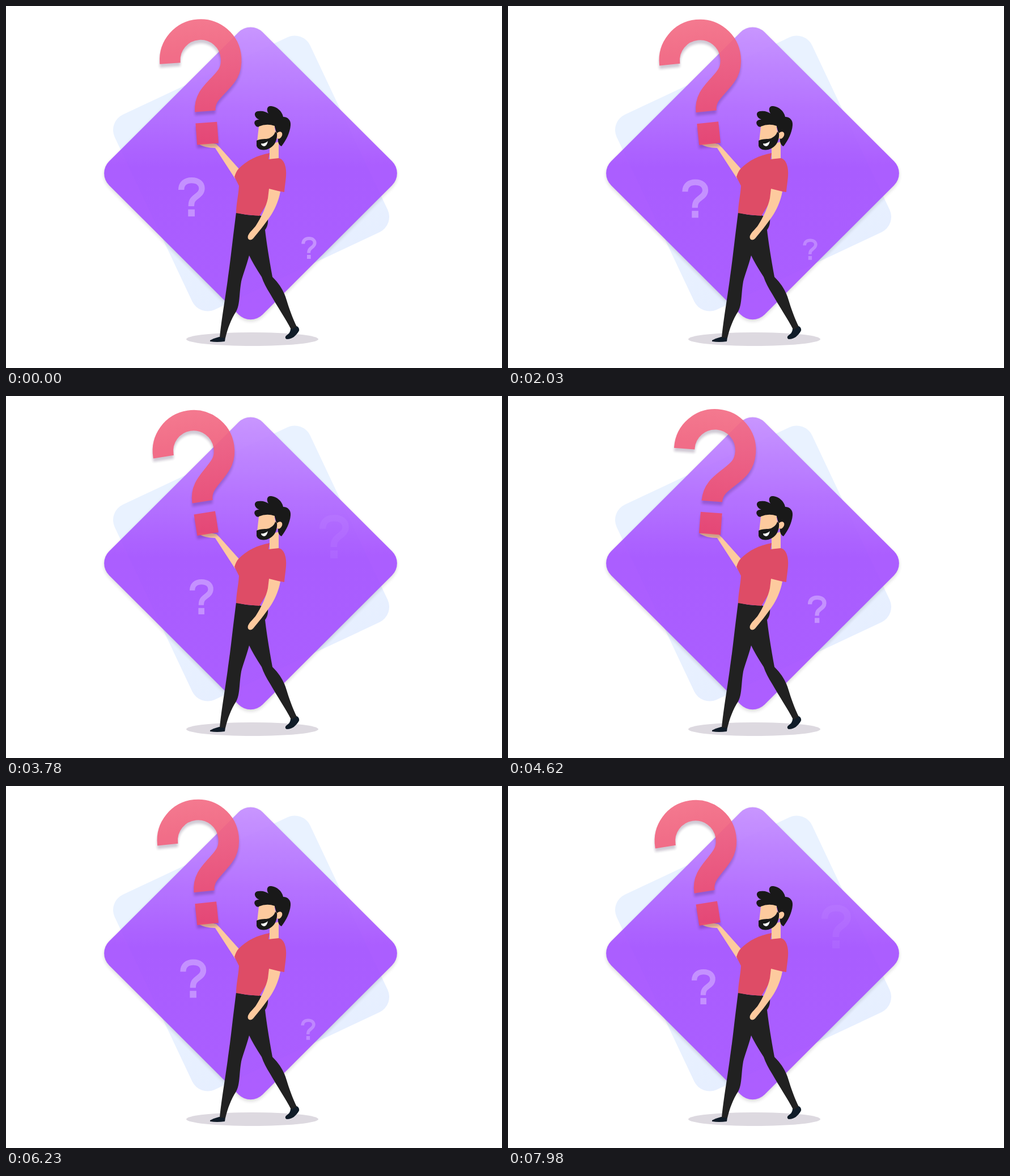
An HTML page for the animation above (8000 ms loop, 875 by 640 pixels).

```html
<!DOCTYPE html>
<html lang="en">
<head>
<meta charset="utf-8">
<title>Man balancing a question mark</title>
<style>
  html, body { margin: 0; width: 100%; height: 100%; overflow: hidden; background: #fff; }
  svg { display: block; width: 100%; height: 100%; }
  .diamond { filter: drop-shadow(0 3px 3px rgba(0, 0, 0, .16)); opacity: .94; }
  .big { filter: drop-shadow(0 6px 2px rgba(40, 10, 60, .24)); opacity: .93; }
  .skin { fill: #fdca9e; }
  .hair { fill: #191919; }
</style>
</head>
<body>
<svg viewBox="0 0 875 640">
  <defs>
    <linearGradient id="sky" gradientUnits="userSpaceOnUse" x1="0" y1="55" x2="0" y2="537">
      <stop offset="0" stop-color="#e9f2ff"/><stop offset="1" stop-color="#dfe6ff"/>
    </linearGradient>
    <!-- Runs along the diagonal of the rotated square, so top to bottom on stage. -->
    <linearGradient id="violet" gradientUnits="userSpaceOnUse" x1="-191" y1="-191" x2="191" y2="191">
      <stop offset="0" stop-color="#c793ff"/><stop offset=".28" stop-color="#b26cff"/>
      <stop offset=".48" stop-color="#a654ff"/><stop offset="1" stop-color="#a855ff"/>
    </linearGradient>
    <linearGradient id="pink" gradientUnits="userSpaceOnUse" x1="0" y1="23" x2="0" y2="244">
      <stop offset="0" stop-color="#f46f87"/><stop offset="1" stop-color="#e9456c"/>
    </linearGradient>
    <g id="mark">
      <path d="M7.5 32C7.5 16 18 7.5 34 7.5C50 7.5 60 16 60 28C60 38 54 43 46 49C37 56 33 60 33 74"
            fill="none" stroke="#fff" stroke-width="15"/>
      <path d="M25 82h17v18h-17z" fill="#fff"/>
    </g>
  </defs>

  <rect x="-190.5" y="-190.5" width="381" height="381" rx="30" fill="url(#sky)"
        transform="translate(432.5 296) rotate(-25.2)"/>
  <g class="diamond">
    <rect x="-191.5" y="-191.5" width="383" height="383" rx="30" fill="url(#violet)"
          transform="translate(431.5 295.8) rotate(45)"/>
  </g>
  <use id="left" href="#mark"/>
  <use id="right" href="#mark"/>

  <ellipse cx="434.5" cy="589" rx="116.5" ry="12" fill="#ddd9e0"/>

  <!-- man -->
  <path fill="#101c28" d="M360 591Q368 587 376 585L387 586L386 593Q372 595 360 593ZM502 571L513 566Q518 569 517 574C512 583 505 589 495 589Q491 587 494 583Q502 578 502 571Z"/>
  <path fill="#212121" d="M406 365Q425 371 447 370L462 376C463 385 460 392 457 396Q461 430 470 479C484 493 491 506 495 520C500 537 507 555 513 567L503 572C494 554 479 532 466 509C459 498 454 488 451 479Q436 456 429 441C424 460 417 478 415 487C411 510 413 527 406 540C397 554 391 570 387 587L377 586C380 555 387 515 391 485C396 450 398 430 401 405Z"/>
  <path class="skin" d="M338 243C348 241 362 242 371 244L378 251L411 288L404 305L369 251C357 251 345 248 338 243Z"/>
  <path class="skin" d="M465 245L465 272L481 271L481 240Z"/>
  <path fill="#de4c66" d="M465 260C443 264 425 273 411 287Q406 292 403 302L411 318C410 335 406 350 406 366Q426 370 447 371L463 345L466 325L491 329C492 315 495 302 494 291C493 278 488 270 481 269Q471 270 463 271Z"/>
  <path class="skin" d="M464 323L484 328C481 345 473 362 466 372C455 388 445 400 436 411C431 416 425 413 427 406C430 399 437 394 441 388C450 374 459 355 462 340Z"/>
  <path class="hair" d="M440 211C436 206 439 200 447 201C437 197 436 186 446 186C453 185 458 187 463 190C459 184 460 176 468 177C478 178 487 186 489 196C497 196 503 202 502 211C501 224 494 238 486 248C482 247 479 240 480 236L474 213C467 210 455 210 449 213C444 215 441 213 440 211Z"/>
  <path class="skin" d="M446 213Q460 207 474 212Q473 219 478 225C482 220 489 222 487 229C485 234 481 236 479 234L470 244L443 240Z"/>
  <path class="hair" d="M442 238C450 234 458 236 464 234C470 231 474 227 475 222L478 225C479 235 475 246 466 251C456 257 444 255 442 247Z"/>
  <path fill="#fff" d="M450 243Q456 244 462 239Q460 248 455 248Q450 247 450 243Z"/>

  <g class="big">
    <g id="big">
      <path d="M300 97V95A54 54 0 0 1 408 95C408 118 397 128 385 139C370 153 355.5 163 355.5 186"
            fill="none" stroke="url(#pink)" stroke-width="36.5"/>
      <path d="M337 206h38v38h-38z" fill="url(#pink)"/>
    </g>
  </g>
</svg>
<script>
const LOOP = 8000, CYCLE = 2100, STEP = 70, MARK_OPACITY = 0.32;
const byId = id => document.getElementById(id);
const clamp = v => Math.min(1, Math.max(0, v));

// path: [time, centre x, centre y]; fades: [start, end] times within the cycle
const marks = [
  { node: byId('left'), fadeIn: [560, 850], fadeOut: [2150, 2450],
    height: t => 33.4 + 0.017 * t,
    path: [[560, 369, 439], [770, 364, 422], [1260, 356.5, 385.5], [1330, 355, 380],
           [1680, 345, 355], [2100, 327.5, 337.5], [2460, 309, 326]] },
  { node: byId('right'), fadeIn: [-230, -30], fadeOut: [1400, 1730],
    height: t => 39 + 0.0226 * t,
    path: [[-230, 530, 436], [0, 534.5, 427.5], [300, 544, 392], [630, 548, 350.5],
           [770, 547.5, 334.5], [1260, 550.5, 279], [1330, 552.5, 270], [1680, 579, 248.5], [1750, 585, 245]] }
];

function pointAt(path, t) {
  const next = Math.max(1, path.findIndex(p => p[0] >= t));
  const [t0, x0, y0] = path[next - 1], [t1, x1, y1] = path[next];
  const k = (t - t0) / (t1 - t0);
  return [x0 + (x1 - x0) * k, y0 + (y1 - y0) * k];
}

function drawMark({ node, fadeIn, fadeOut, height, path }, time) {
  const start = fadeIn[0];
  const t = start + (time - start + CYCLE) % CYCLE;
  const visible = t < fadeOut[1];
  node.style.display = visible ? '' : 'none';
  if (!visible) return;
  const ramp = ([a, b]) => clamp((t - a) / (b - a));
  const [x, y] = pointAt(path, t);
  node.setAttribute('opacity', MARK_OPACITY * ramp(fadeIn) * (1 - ramp(fadeOut)));
  node.setAttribute('transform', `translate(${x} ${y}) scale(${height(t) / 100}) translate(-34 -50)`);
}

function draw(now) {
  const time = Math.floor(now % LOOP / STEP) * STEP;
  // a swing with nearly constant speed and softened turns
  const phase = 2 * Math.PI * (time - 207) / CYCLE;
  const angle = 8.8 * (Math.sin(phase) - Math.sin(3 * phase) / 9);
  byId('big').setAttribute('transform', `rotate(${angle} 356 243)`);
  marks.forEach(mark => drawMark(mark, time));
}

function tick() {
  draw(performance.now());
  requestAnimationFrame(tick);
}
tick();
</script>
</body>
</html>
```
